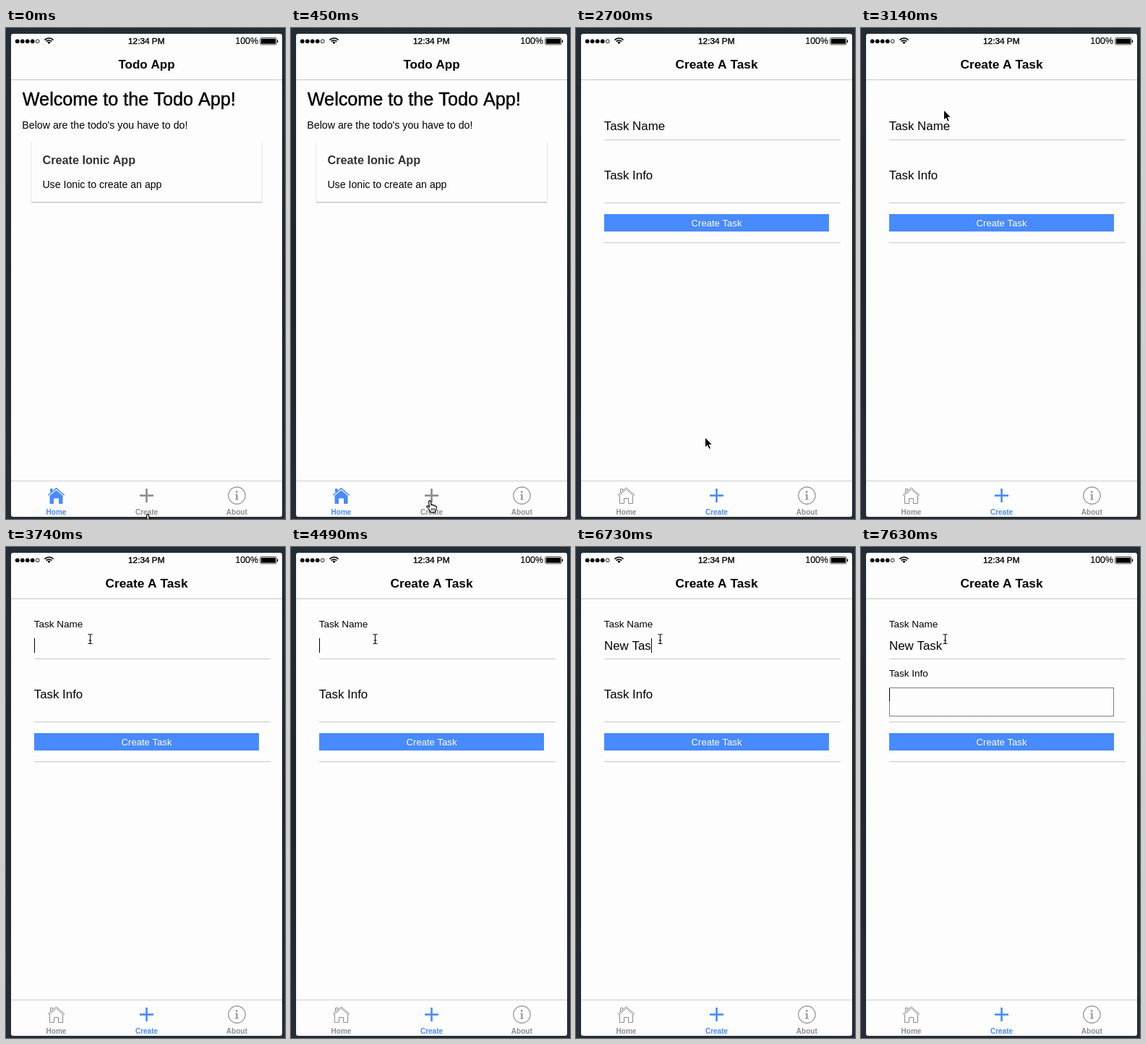
Animation, 386 px wide and 678 px high, one loop 8000 ms. Source, as an HTML page with a canvas:

```html
<!DOCTYPE html>
<html lang="en">
<head>
<meta charset="utf-8">
<title>Todo App</title>
<style>
html, body { margin: 0; width: 100%; height: 100%; overflow: hidden; background: #212a32; }
canvas { display: block; width: 386px; height: 678px; }
</style>
</head>
<body>
<canvas id="stage"></canvas>
<script>
const W = 386, H = 678, LOOP = 8000;
const BLUE = '#488aff', GRAY = '#8c8c8c', PAPER = '#fdfdfd', LINE = '#c8c7cc';
const canvas = document.getElementById('stage');
const dpr = window.devicePixelRatio || 1;
canvas.width = W * dpr;
canvas.height = H * dpr;
const ctx = canvas.getContext('2d');
ctx.scale(dpr, dpr);

const lerp = (a, b, p) => a + (b - a) * p;
const ease = p => p * p * (3 - 2 * p);

// Last entry of [time, ...values] that has started
const at = (steps, t) => steps.filter(s => s[0] <= t).pop();

function rect(x, y, w, h, color) {
  ctx.fillStyle = color;
  ctx.fillRect(x, y, w, h);
}

function text(str, x, y, size, { color = '#000', bold = false, align = 'left', heavy = 0 } = {}) {
  ctx.font = `${bold ? 'bold ' : ''}${size}px "Liberation Sans", Arial, sans-serif`;
  ctx.textAlign = align;
  ctx.fillStyle = color;
  ctx.fillText(str, x, y);
  if (heavy) {
    ctx.strokeStyle = color;
    ctx.lineWidth = heavy;
    ctx.lineJoin = 'round';
    ctx.strokeText(str, x, y);
  }
}

function shape(d, { fill, stroke, width = 1, x = 0, y = 0 }) {
  const path = new Path2D(d);
  ctx.save();
  ctx.translate(x, y);
  ctx.lineJoin = 'round';
  if (fill) { ctx.fillStyle = fill; ctx.fill(path); }
  if (stroke) { ctx.strokeStyle = stroke; ctx.lineWidth = width; ctx.stroke(path); }
  ctx.restore();
}

function circle(x, y, r, fill, stroke, width = 1) {
  ctx.beginPath();
  ctx.arc(x, y, r, 0, Math.PI * 2);
  if (fill) { ctx.fillStyle = fill; ctx.fill(); }
  if (stroke) { ctx.strokeStyle = stroke; ctx.lineWidth = width; ctx.stroke(); }
}

function frame() {
  const g = ctx.createLinearGradient(0, 0, 0, H);
  g.addColorStop(0, '#232d35');
  g.addColorStop(0.5, '#1e272e');
  g.addColorStop(1, '#242d39');
  rect(0, 0, W, H, g);
  ctx.fillStyle = PAPER;
  ctx.beginPath();
  ctx.roundRect(7, 8, 375, 667, 3);
  ctx.fill();
}

function statusBar() {
  for (let i = 0; i < 4; i++) circle(15.7 + i * 7, 18.3, 2.9, '#000');
  circle(43.7, 18.3, 2.4, null, '#000', 0.9);

  const wifiY = 22.3, sweep = Math.PI * 0.26;
  ctx.strokeStyle = '#000';
  ctx.lineWidth = 1.7;
  for (const r of [8.3, 5.3]) {
    ctx.beginPath();
    ctx.arc(59.5, wifiY, r, -Math.PI / 2 - sweep, -Math.PI / 2 + sweep);
    ctx.stroke();
  }
  shape('M59.5 22.3 L57.3 19.7 Q59.5 17.8 61.7 19.7Z', { fill: '#000' });

  text('12:34 PM', 194.3, 22, 11.8, { align: 'center', heavy: 0.4 });
  text('100%', 349, 22.3, 12.4, { align: 'right', heavy: 0.15 });
  ctx.strokeStyle = '#000';
  ctx.lineWidth = 0.7;
  ctx.beginPath();
  ctx.roundRect(351.6, 13.6, 22.6, 9.4, 1.8);
  ctx.stroke();
  rect(352.8, 14.8, 20.2, 7, '#000');
  rect(374.9, 16.6, 1.3, 3.4, '#000');
}

function homeIcon(on) {
  if (on) {
    shape('M69.5 638.2 L78.5 645.8 V657 H73 V649.5 H66 V657 H60.5 V645.8Z', { fill: BLUE });
    shape('M58.3 645.3 L69.5 635.6 L80.7 645.3', { stroke: BLUE, width: 1.5 });
    rect(61, 636, 3.4, 4.8, BLUE);
  } else {
    shape('M60.5 646 V656.5 H66.5 V649.5 H72.5 V656.5 H78.5 V646 M61.5 641 V636.5 H64.5 V638.4' +
      ' M58.3 644.6 L69.5 634.8 L80.7 644.6 L79.6 645.9 L69.5 637.1 L59.4 645.9Z',
      { stroke: GRAY });
  }
}

function tabBar(onCreate) {
  const homeColor = onCreate ? GRAY : BLUE, createColor = onCreate ? BLUE : GRAY;
  const label = (str, x, color) => text(str, x, 672, 10, { color, bold: true, align: 'center' });
  rect(7, 625, 375, 1, '#cfcfcf');
  homeIcon(!onCreate);
  rect(193.2, 636, 2.6, 19, createColor);
  rect(185, 644.3, 19, 2.6, createColor);
  circle(319.4, 645.6, 11.7, null, GRAY, 1.2);
  circle(319.2, 640.6, 1.4, GRAY);
  shape('M317.1 643.8 H320.4 V650.4 H321.8 V651.4 H317.1 V650.4 H318.4 V644.8 H317.1Z', { fill: GRAY });
  label('Home', 69.5, homeColor);
  label('Create', 194.5, createColor);
  label('About', 319.3, GRAY);
}

function header(title, size) {
  text(title, 194.5, 56, size, { bold: true, align: 'center' });
  rect(7, 71, 375, 1, LINE);
}

function homePage() {
  header('Todo App', 17);
  text('Welcome to the Todo App!', 22.8, 107.3, 25.2, { heavy: 0.45 });
  text("Below are the todo's you have to do!", 22.3, 139, 14.2);
  rect(34, 157, 1, 82, '#e6e6e6');
  rect(354, 157, 1, 82, '#e6e6e6');
  rect(35, 240, 319, 1, '#c0c0c0');
  rect(34.5, 239, 0.8, 1.4, '#cfcfcf');
  rect(353.7, 239, 0.8, 1.4, '#cfcfcf');
  rect(35.5, 241, 318, 1, '#e9e9e9');
  text('Create Ionic App', 50.5, 188, 16.2, { color: '#333', bold: true });
  text('Use Ionic to create an app', 50.4, 221, 14.15);
}

// Label that shrinks and rises above its field as p goes 0 to 1
function floatLabel(str, y, p) {
  text(str, 38.8, lerp(y, y - 30, p), lerp(16.85, 13.5, p));
}

const TYPED = [[0, 0], [5090, 1], [5240, 2], [5390, 3], [5840, 4], [6290, 5], [6440, 6], [6730, 7], [6880, 8]];
const CARET = [[0, false], [3590, true], [4040, false], [4490, true], [7330, false]];
const NAME_LIFT = [[0, 0], [3590, 0.5], [3740, 1]];
const INFO_LIFT = [[0, 0], [7480, 0.5], [7630, 1]];

function createPage(t) {
  header('Create A Task', 17.3);
  for (const y of [154, 241, 296]) rect(39, y, 327, 1, LINE);
  rect(39, 257, 311, 24, BLUE);
  text('Create Task', 194.5, 274, 13.1, { color: '#fff', align: 'center' });

  floatLabel('Task Name', 141, at(NAME_LIFT, t)[1]);
  floatLabel('Task Info', 209, at(INFO_LIFT, t)[1]);

  const typed = 'New Task'.slice(0, at(TYPED, t)[1]);
  text(typed, 39, 142, 16.92);
  if (at(CARET, t)[1]) rect(Math.round(39 + ctx.measureText(typed).width), 126, 1, 20, '#000');

  if (t >= 7480) {
    ctx.save();
    ctx.strokeStyle = '#000';
    ctx.lineWidth = 1;
    ctx.setLineDash([1, 1]);
    ctx.strokeRect(39.5, 194.5, 310, 39);
    ctx.restore();
    rect(39, 195, 1, 18, '#000');
  }
}

function hand(x, y) {
  shape('M3.6 2.2 Q3.6 .6 5.1 .6 Q6.5 .6 6.6 2.2 L7 6.8 Q8.2 5.6 9.4 6.8 L9.6 7.4 Q11 6.4 12 7.8' +
    ' L12.2 8.4 Q14.3 7.8 14.4 9.6 Q14.4 12.5 12.8 14.6 L12.6 16.8 H6 Q5.6 14.8 4 13' +
    ' Q2.2 10.6 .8 9.2 Q.6 7.6 2.2 7.8 L4.4 9.6Z',
    { fill: '#fff', stroke: '#000', width: 1.2, x, y });
  shape('M7.3 11 V14.4 M9.3 11 V14.4 M11.3 11 V14.4', { stroke: '#000', width: 0.9, x, y });
}

function arrow(x, y) {
  shape('M0 0 V14.2 L3.2 11.2 L5.4 16.3 L7.8 15.2 L5.6 10.3 H10Z',
    { fill: '#000', stroke: '#fff', width: 1.2, x, y });
  shape('M.5 1.3 V13 L3.3 10.4 L5.7 15.6 L7 15 L4.7 9.8 H8.9Z', { fill: '#000', x, y });
}

function beam(x, y) {
  const d = 'M-3 -6.5 H-1.5 Q0 -6.5 0 -5 V5 Q0 6.5 -1.5 6.5 H-3 M3 -6.5 H1.5 Q0 -6.5 0 -5' +
    ' M0 5 Q0 6.5 1.5 6.5 H3 M-2 2 H2';
  shape(d, { stroke: 'rgba(255,255,255,.8)', width: 2.4, x, y });
  shape(d, { stroke: '#111', width: 1.1, x, y });
}

const RISE = [[0, 4, 19], [150, 3, 13], [300, 1, 4], [450, 0, 0]];
const TRAVEL = [[2700], [2850], [2990], [3140]];

function pointer(t) {
  if (t < 2700) {
    const [, dx, dy] = at(RISE, t);
    hand(187 + dx, 652 + dy);
  } else if (t < 3290) {
    const p = ease((at(TRAVEL, t)[0] - 2550) / 590);
    arrow(lerp(191, 114.5, p), lerp(652, 113, p));
  } else {
    beam(116.5, t < 3440 ? 124 : 127);
  }
}

function draw(t) {
  const onCreate = t >= 2100;
  frame();
  statusBar();
  if (onCreate) createPage(t); else homePage();
  tabBar(onCreate);
  pointer(t);
}

const start = performance.now();
function tick() {
  draw((performance.now() - start) % LOOP);
  requestAnimationFrame(tick);
}
tick();
</script>
</body>
</html>
```
